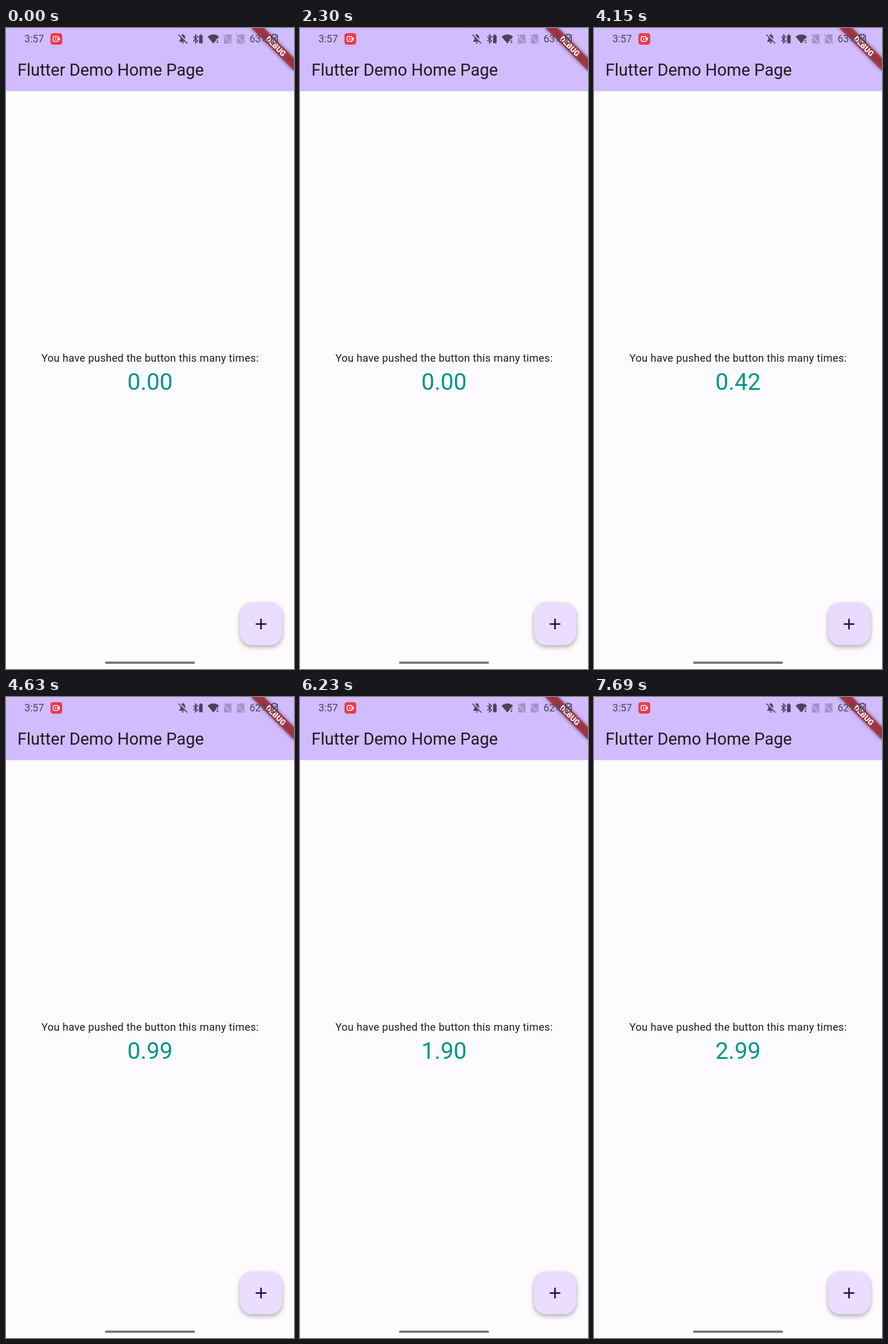
Recreate the animation shown at these times as an HTML page. Size 502 px wide and 1116 px high, loop 8 s.

```html
<!DOCTYPE html>
<html lang="en">
<head>
<meta charset="utf-8">
<title>Counter demo</title>
<style>
html, body { margin: 0; height: 100%; overflow: hidden; background: #fdfbfd; }
svg { display: block; width: 100vw; height: 100vh; font-family: Roboto, sans-serif; }
.fab { fill: #eaddff; filter: drop-shadow(0 4px 4px rgba(0,0,0,.2)) drop-shadow(0 1px 3px rgba(0,0,0,.16)); }
.status { fill: #4a4259; font-size: 17.5px; }
.line { fill: none; stroke: #4a4259; stroke-width: 1.7; }
</style>
</head>
<body>
<svg viewBox="0 0 502 1116">
  <defs>
    <filter id="blur" x="-50%" y="-100%" width="200%" height="300%"><feGaussianBlur stdDeviation="3"/></filter>
    <g id="sim" opacity=".33">
      <path d="M5 0H13V16H0V5Z" fill="#4a4259"/>
      <path d="M-2 0L14 17" stroke="#d0bcff" stroke-width="3"/>
      <path d="M-1 0L14 16" stroke="#4a4259" stroke-width="1.6"/>
    </g>
  </defs>

  <rect width="502" height="1116" fill="#fdfbfd"/>
  <rect y="1094" width="502" height="22" fill="#fdfdfc"/>
  <rect width="502" height="110" fill="#d0bcff"/>
  <text x="20" y="83" font-size="29" fill="#1d1b20">Flutter Demo Home Page</text>
  <text x="61.7" y="581" font-size="18.4" letter-spacing=".3" fill="#1d1b20">You have pushed the button this many times:</text>
  <text id="count" x="251" y="630" font-size="40.5" text-anchor="middle" fill="#009688">0.00</text>

  <!-- floating button -->
  <rect class="fab" x="408" y="1001" width="73.5" height="73.5" rx="21"/>
  <rect id="press" x="408" y="1001" width="73.5" height="73.5" rx="21" fill="#21005d" opacity="0"/>
  <path d="M435.2 1037.7H453.8M444.5 1028.4V1047" stroke="#21005d" stroke-width="2.6"/>
  <g id="touch" opacity="0">
    <circle cx="443.5" cy="1049.5" r="14.3" fill="#fff" fill-opacity=".25" stroke="#a79bb8" stroke-opacity=".45"/>
    <circle cx="443.5" cy="1049.5" r="3" fill="#fff" fill-opacity=".6"/>
  </g>

  <!-- corner banner -->
  <g transform="translate(502 0) rotate(45)">
    <rect x="-53" y="36.9" width="106" height="15.8" opacity=".5" filter="url(#blur)"/>
    <rect x="-53" y="36.9" width="106" height="15.8" fill="#b71c1c" fill-opacity=".65"/>
    <text y="49.5" font-size="13.4" font-weight="900" text-anchor="middle" fill="#fff">DEBUG</text>
  </g>

  <!-- status bar -->
  <g class="status">
    <text x="32.3" y="25">3:57</text>
    <text id="battery" x="424.5" y="25">63%</text>
    <path d="M302 24V22.5L304 20.5V16.5C304 13.8 305.4 12.2 307 11.7C307 10 309.2 10 309.2 11.7C311.6 12.4 312.3 14.6 312.3 16.5V20.5L314.3 22.5V24ZM306.4 25H310C310 27.6 306.4 27.6 306.4 25Z"/>
    <path d="M301.5 11L316 26" stroke="#d0bcff" stroke-width="3.6"/>
    <path class="line" d="M300.5 11.5L316 27"/>
    <path class="line" d="M326.5 15L334 22.5L330.3 26V12L334 15.5L326.5 23" stroke-width="1.5"/>
    <path d="M336.5 13H338V11.3H341V13H342.7V26.5H336.5Z"/>
    <path d="M351.5 15.2C357 10 366 10 371.3 15.2L361.4 27Z"/>
    <path d="M366 19H372V28H366Z" fill="#d0bcff"/>
    <path d="M367.3 20.5H370V22.2H367.3ZM367.3 24H370V26H367.3Z"/>
    <use href="#sim" x="380" y="11"/>
    <use href="#sim" x="402.5" y="11"/>
    <path class="line" d="M462.5 12.5H465.5V11H470V12.5H473V26.5H462.5ZM464 15L471.5 24M471.5 15L464 24"/>
  </g>
  <rect x="77.5" y="9" width="20.5" height="20" rx="4.5" fill="#f0394b"/>
  <rect x="82.3" y="14.8" width="8.4" height="8.4" rx="1.5" fill="none" stroke="#fff" stroke-width="1.5"/>
  <path d="M90.7 17.7L93.6 15.8V22.2L90.7 20.3Z" fill="#fff"/>
  <circle cx="86.5" cy="19" r="1.5" fill="#fff"/>

  <rect x="172.5" y="1103" width="157" height="4" rx="2" fill="#7c7a79"/>
</svg>
<script>
const LOOP = 8000, STEP = 25, COUNT_TIME = 1000;
const taps = [3697, 5382, 6708]; // release times
const el = id => document.getElementById(id);
const clamp = x => Math.max(0, Math.min(1, x));
const ramp = (t, a, b) => clamp((t - a) / (b - a));

// cubic-bezier(.42, 0, .58, 1)
function easeInOut(x) {
  let lo = 0, hi = 1;
  for (let i = 0; i < 24; i++) {
    const s = (lo + hi) / 2, r = 1 - s;
    if (3 * r * r * s * .42 + 3 * r * s * s * .58 + s ** 3 < x) lo = s; else hi = s;
  }
  return lo * lo * (3 - 2 * lo);
}

function draw() {
  const t = Math.floor(performance.now() % LOOP / STEP) * STEP;
  let value = 0, press = 0, touch = 0;
  taps.forEach((up, i) => {
    const dt = t - up;
    if (dt >= 0) value = (i + 1) * easeInOut(clamp(dt / COUNT_TIME));
    press += ramp(dt, 60, 200) * (1 - ramp(dt, 270, 470));
    touch += ramp(dt, -180, -140) * (1 - ramp(dt, 60, 90));
  });
  el('count').textContent = value.toFixed(2);
  el('press').setAttribute('opacity', .12 * press);
  el('touch').setAttribute('opacity', touch);
  el('battery').textContent = t < 4300 ? '63%' : '62%';
  requestAnimationFrame(draw);
}
draw();
</script>
</body>
</html>
```
